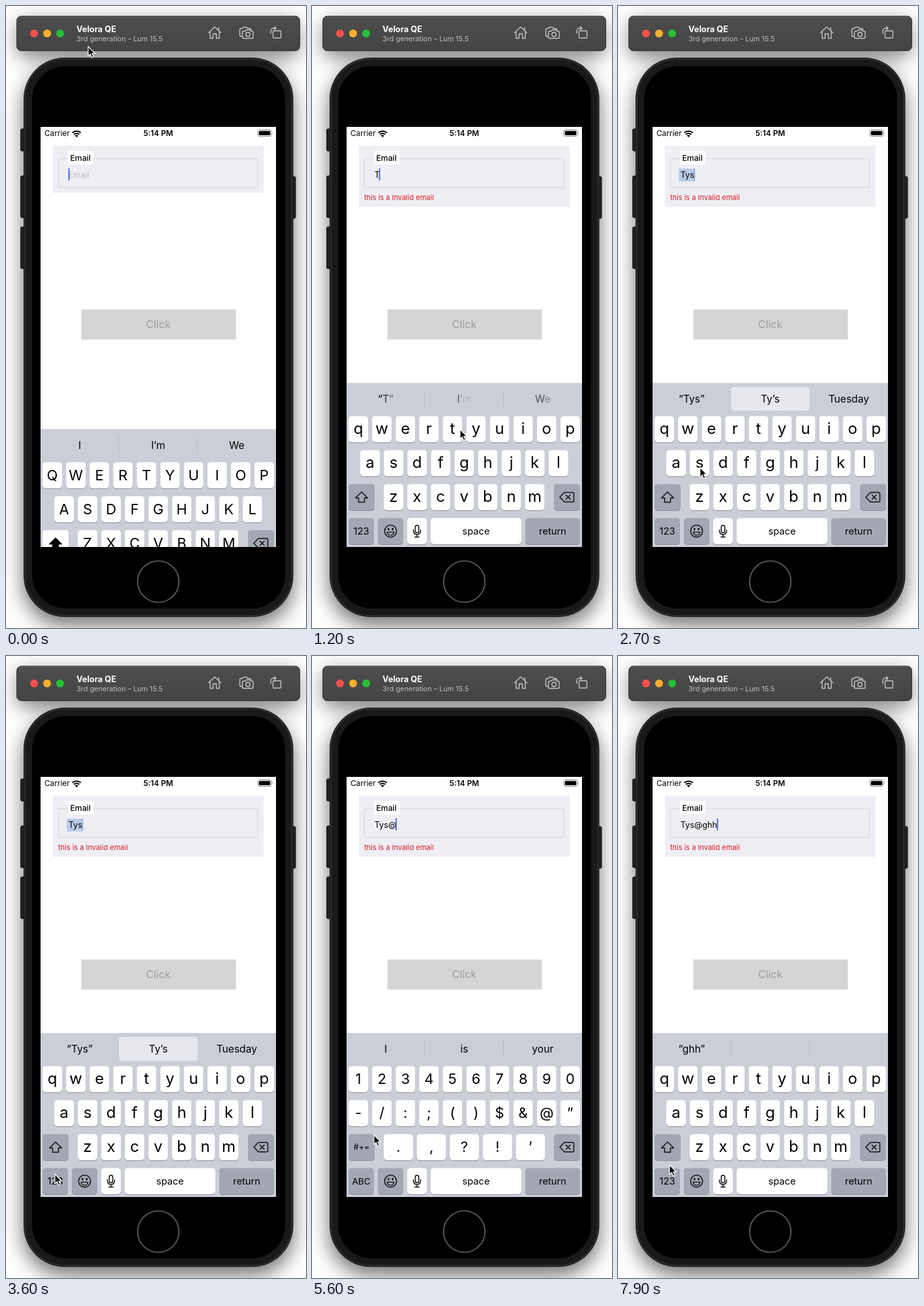
An HTML page that plays this animation: 460x952 px, repeating every 8 s.

```html
<!DOCTYPE html>
<html>
<head>
<meta charset="utf-8">
<style>
html, body { margin: 0; width: 100%; height: 100%; overflow: hidden; background: #fff }
svg { display: block; width: 460px; height: 952px; font-family: Inter, Roboto, sans-serif }
.line { fill: none; stroke: #c6c6c6; stroke-width: 1.4; stroke-linejoin: round; stroke-linecap: round }
.ink { fill: none; stroke: #111; stroke-width: 1.5; stroke-linejoin: round; stroke-linecap: round }
</style>
</head>
<body>
<svg viewBox="0 0 460 952">
  <defs>
    <filter id="soft" x="-20%" y="-20%" width="140%" height="140%"><feGaussianBlur stdDeviation="15"/></filter>
    <clipPath id="screen"><rect x="53" y="185" width="361" height="643"/></clipPath>
    <linearGradient id="bar" x2="0" y2="1"><stop stop-color="#4d4d4d"/><stop offset="1" stop-color="#444"/></linearGradient>
  </defs>
  <rect width="460" height="952" fill="#fff"/>
  <g filter="url(#soft)">
    <rect x="18" y="24" width="430" height="54" rx="8" opacity=".5"/>
    <rect x="26" y="92" width="415" height="856" rx="64" opacity=".55"/>
  </g>

  <rect x="16.5" y="15.5" width="434" height="53" rx="7" fill="url(#bar)" stroke="#333"/>
  <path d="M23 16.5H444" stroke="#6e6e6e"/>
  <circle cx="43" cy="42" r="6" fill="#f8514b"/>
  <circle cx="63" cy="42" r="6" fill="#f8b02c"/>
  <circle cx="83" cy="42" r="6" fill="#25c136"/>
  <text x="108" y="40" font-size="12.8" font-weight="700" fill="#fff">Velora QE</text>
  <text x="108" y="54" font-size="10.9" fill="#bdbdbd">3rd generation – Lum 15.5</text>
  <g class="line">
    <path d="M310.5 41L320 32l9.500 9M313 39.500V49.500H317.500V42.500H322.500V49.500H327V39.500M326 37.500V33"/>
    <path d="M361.500 46.500H360a1.500 1.500 0 0 1-1.500-1.500V36a1.500 1.500 0 0 1 1.500-1.500H362L364 32.500H369L371 34.500H374a1.500 1.500 0 0 1 1.500 1.500V37"/>
    <path d="M364 38.500H366.500L368.500 36.500H374L376 38.500H377.500a1.500 1.500 0 0 1 1.500 1.500V48a1.500 1.500 0 0 1-1.500 1.500H364a1.500 1.500 0 0 1-1.500-1.500V40a1.500 1.500 0 0 1 1.500-1.500Z"/>
    <circle cx="371" cy="43.500" r="3.200"/>
    <rect x="409.500" y="38" width="12" height="11" rx="1.200"/>
    <path d="M406 42V38a4 4 0 0 1 4-4H414M411.500 31.500L414 34L411.500 36.500"/>
  </g>

  <g fill="#242424" stroke="#111">
    <rect x="22.500" y="188" width="8" height="34" rx="2"/>
    <rect x="22.500" y="260" width="8" height="64" rx="2"/>
    <rect x="22.500" y="338" width="8" height="64" rx="2"/>
    <rect x="436" y="261" width="8" height="64" rx="2"/>
  </g>
  <rect x="27" y="79" width="413.500" height="856" rx="63" fill="#111"/>
  <rect x="29" y="81" width="409.500" height="852" rx="61" fill="#191919" stroke="#303030" stroke-width="2"/>
  <rect x="40" y="92" width="388" height="830" rx="51"/>
  <circle cx="233.500" cy="881" r="31.700" fill="#000" stroke="#5b5b5b" stroke-width="1.800"/>

  <g clip-path="url(#screen)">
    <rect x="53" y="185" width="361" height="643" fill="#fff"/>
    <text x="59" y="199.200" font-size="11.800">Carrier</text>
    <g fill="none" stroke="#000" stroke-width="2.100">
      <path d="M101.700 194a9.500 9.500 0 0 1 13 0M104 196.600a6.200 6.200 0 0 1 8.400 0"/>
    </g>
    <path d="M108.200 201L105.700 198.300a3.700 3.700 0 0 1 5 0Z"/>
    <text x="233.500" y="199.200" font-size="11.800" font-weight="600" text-anchor="middle">5:14 PM</text>
    <rect x="386" y="189.500" width="21" height="10" rx="2.800" fill="none" stroke="#888"/>
    <rect x="387.700" y="191.200" width="17.600" height="6.600" rx="1.500"/>
    <path d="M408.500 193q1.500 1.500 0 3.500Z" fill="#888"/>
    <g id="form"></g>
    <rect x="115.500" y="464.500" width="237" height="46" fill="#d5d5d5"/>
    <text x="233.500" y="493" font-size="16" fill="#9c9c9c" text-anchor="middle">Click</text>
    <g id="keys"></g>
  </g>
  <path id="mouse" d="M0 0V14.500L3.300 11.500L5.700 17L8.300 15.900L5.900 10.500H10.300Z" stroke="#fff" stroke-width="1.200"/>
</svg>
<script>
const LOOP = 8000, STEP = 100, PITCH = 36.1;
const $ = id => document.getElementById(id);
const clamp = v => Math.max(0, Math.min(1, v));
const last = (list, t) => list.filter(e => e[0] <= t).pop();

// pointer stops: time, x, y
const path = [[0, 126, 62], [300, 150, 230], [900, 213, 648], [1100, 216, 650], [1200, 227, 648],
  [1400, 249, 648], [1500, 249, 649], [1900, 129, 695], [2000, 131, 692], [2100, 142, 680],
  [2500, 135, 690], [3300, 76, 795], [3600, 75, 793], [3800, 75, 796], [4500, 358, 697],
  [4800, 358, 698], [5600, 95, 733], [5800, 77, 799], [6000, 76, 801], [6400, 234, 694],
  [6600, 236, 693], [6800, 271, 690], [6900, 272, 689], [7300, 271, 691], [7900, 79, 779], [8000, 77, 790]];
// time, text, caret x
const typed = [[0, "", 96.5], [1100, "T", 103.5], [1500, "Ty", 110.3], [2100, "Tys", 117], [4800, "Tys@", 129],
  [6500, "Tys@g", 137], [6900, "Tys@gh", 145], [7300, "Tys@ghh", 152.5]];
// start, end, key held
const presses = [[1000, 1100, "T"], [1400, 1500, "y"], [1900, 2000, "s"], [4700, 4800, "@"],
  [6400, 6500, "g"], [6900, 6900, "h"], [7200, 7300, "h"]];
// time of reveal, words
const hints = [[-900, "I", "I’m", "We"], [1140, "“T”", "I’m", "We"], [1700, "“Ty”", "typically", "typical"],
  [2250, "“Tys”", "Ty’s", "Tuesday"], [4800, "I", "is", "your"], [6835, "“g”", "is", "your"],
  [7050, "“gh”", "", ""], [7450, "“ghh”", "", ""]];

const rect = (x, y, w, h, fill, r = 0) =>
  `<rect x="${x}" y="${y}" width="${w}" height="${h}" rx="${r}" fill="${fill}"/>`;
const text = (s, x, y, size, more = "") => `<text x="${x}" y="${y}" font-size="${size}" ${more}>${s}</text>`;
const mid = (s, x, y, size, more = "") => text(s, x, y, size, 'text-anchor="middle" ' + more);
const esc = s => s.replace("&", "&amp;");

function key(x, y, w, label = "", size = 24, fill = "#fff") {
  return rect(x, y + 1, w, 40, "#898b91", 4.6) + rect(x, y, w, 40, fill, 4.6) +
    mid(esc(label), x + w / 2, y + 20 + (size < 18 ? size * .36 : 7.6), size);
}

function bubble(x, y, label) {
  const c = x + 15;
  return `<path filter="drop-shadow(0 1px 1.5px #0005)" fill="#fff" d="M${c - 19} ${y - 63}h38q9 0 9 9v36
    c0 13-13 13-13 27v26q0 5-5 5h-20q-5 0-5-5v-26c0-14-13-14-13-27v-36q0-9 9-9z"/>` +
    mid(esc(label), c, y - 22, 38, 'font-weight="300"');
}

function form(t) {
  const [, word, caret] = last(typed, t), chosen = t >= 2300 && t < 4800;
  let s = rect(72, 214, 323, word ? 93.5 : 72, "#efeef5") +
    '<rect x="80.5" y="233.500" width="305.500" height="44.500" rx="3" fill="none" stroke="#dddcdf" stroke-width="1.500"/>' +
    rect(95, 222, 39, 20.5, "#fff") + text("Email", 98.5, 236.7, 12.2, 'font-weight="500"');
  if (chosen) s += rect(93.3, 249, 25.2, 19.5, "#b9cbe8");
  s += word ? text(word, 95.7, 262.5, 12.7) + text("this is a Invalid email", 80, 297.3, 11, 'fill="#d51d24"')
    : text("Email", 95.7, 262.5, 12.7, 'fill="#bbbbc1"');
  return s + `<rect x="${caret - .9}" y="248.500" width="1.800" height="18.500" fill="#4360d8" opacity="${chosen ? .3 : 1}"/>`;
}

function hintBar(t) {
  const [start, ...words] = last(hints, t);
  let s = [173, 293.5].map(x => rect(x - .5, 589, 1, 24, "#b6b9c2")).join("");
  if (words[1] == "Ty’s") s += rect(173, 583, 121, 36.5, "#e6e8ed", 5);
  return s + words.map((w, col) => {
    const letters = [...w].map((ch, i) => {
      const o = clamp((t - start) / 100 - i * .25 + [.4, 0, 0][col]);
      return `<tspan fill-opacity="${o.toFixed(2)}">${ch}</tspan>`;
    }).join("");
    return mid(letters, 113 + col * 120.4, 607.2, 15.6);
  }).join("");
}

function keyboard(t) {
  const grey = "#a2a7b3", digits = t >= 3800 && t < 6000, upper = t < 1200;
  const rows = digits ? ["1234567890", "-/:;()$&@”", ".,?!’"] : ["qwertyuiop", "asdfghjkl", "zxcvbnm"];
  const held = presses.find(p => t >= p[0] && t <= p[1]);
  let pop = "", s = rect(53, 577, 361, 330, "#cbced6") + hintBar(t);
  rows.forEach((row, r) => [...row].forEach((ch, i) => {
    const wide = digits && r == 2;
    const x = [56, digits ? 56 : 74, 110][r] + i * (wide ? 50.6 : PITCH), y = 627.7 + r * 52;
    const label = upper ? ch.toUpperCase() : ch;
    const down = held && held[2] == label;
    s += key(x, y, wide ? 45 : 30, down ? "" : label, upper || digits ? 22 : 24);
    if (down) pop = bubble(x, y, label);
  }));
  s += digits ? key(56, 731.7, 40, "#+=", 12.5, grey) : key(56, 731.7, 40, "", 12, upper ? "#fff" : grey) +
    `<path class="ink" ${upper ? 'style="fill:#000"' : ""} d="M76 743.700L85.300 753H80.500V759.500H71.500V753H66.700Z"/>`;
  s += key(371, 731.7, 40, "", 12, grey) +
    '<path class="ink" d="M387 744.500H399.500q2 0 2 2V757q0 2-2 2H387L380 751.700ZM389.500 748.500l6.500 6.500m0-6.500l-6.500 6.500"/>';
  s += key(56, 783.7, 39, digits ? "ABC" : "123", digits ? 13.5 : 14.8, grey) + key(101, 783.7, 39, "", 12, grey) +
    key(146, 783.7, 30) + key(182, 783.7, 139, "space", 14.7) + key(327, 783.7, 84, "return", 14.7, grey);
  s += '<circle class="ink" cx="120.500" cy="803.700" r="9.200"/>' +
    '<ellipse cx="117.300" cy="800.700" rx="1.200" ry="1.900"/><ellipse cx="123.700" cy="800.700" rx="1.200" ry="1.900"/>' +
    '<path class="ink" style="stroke-width:1.200" d="M115 805.300H126q-1.500 4.700-5.500 4.700T115 805.300Z"/>' +
    '<rect class="ink" x="158.300" y="794.700" width="5.400" height="11.500" rx="2.700"/>' +
    '<path class="ink" d="M155.500 802v1.500a5.500 5.500 0 0 0 11 0V802M161 809v3.500M157.800 812.700h6.400"/>';
  return s + pop;
}

function pointer(t) {
  const i = path.findIndex(p => p[0] > t), [t0, x0, y0] = path[i - 1], [t1, x1, y1] = path[i];
  const k = (t - t0) / (t1 - t0), e = k * k * (3 - 2 * k);
  return `translate(${x0 + (x1 - x0) * e} ${y0 + (y1 - y0) * e})`;
}

let shown = -1;
function frame(now) {
  const t = Math.floor(now % LOOP / STEP) * STEP;
  if (t != shown) {
    shown = t;
    $("form").innerHTML = form(t);
    $("keys").innerHTML = keyboard(t);
    $("keys").setAttribute("transform", `translate(0 ${t < 500 ? 70.5 * Math.exp(-t / 70) : 0})`);
    $("mouse").setAttribute("transform", pointer(t));
  }
  requestAnimationFrame(frame);
}
frame(performance.now());
</script>
</body>
</html>
```
